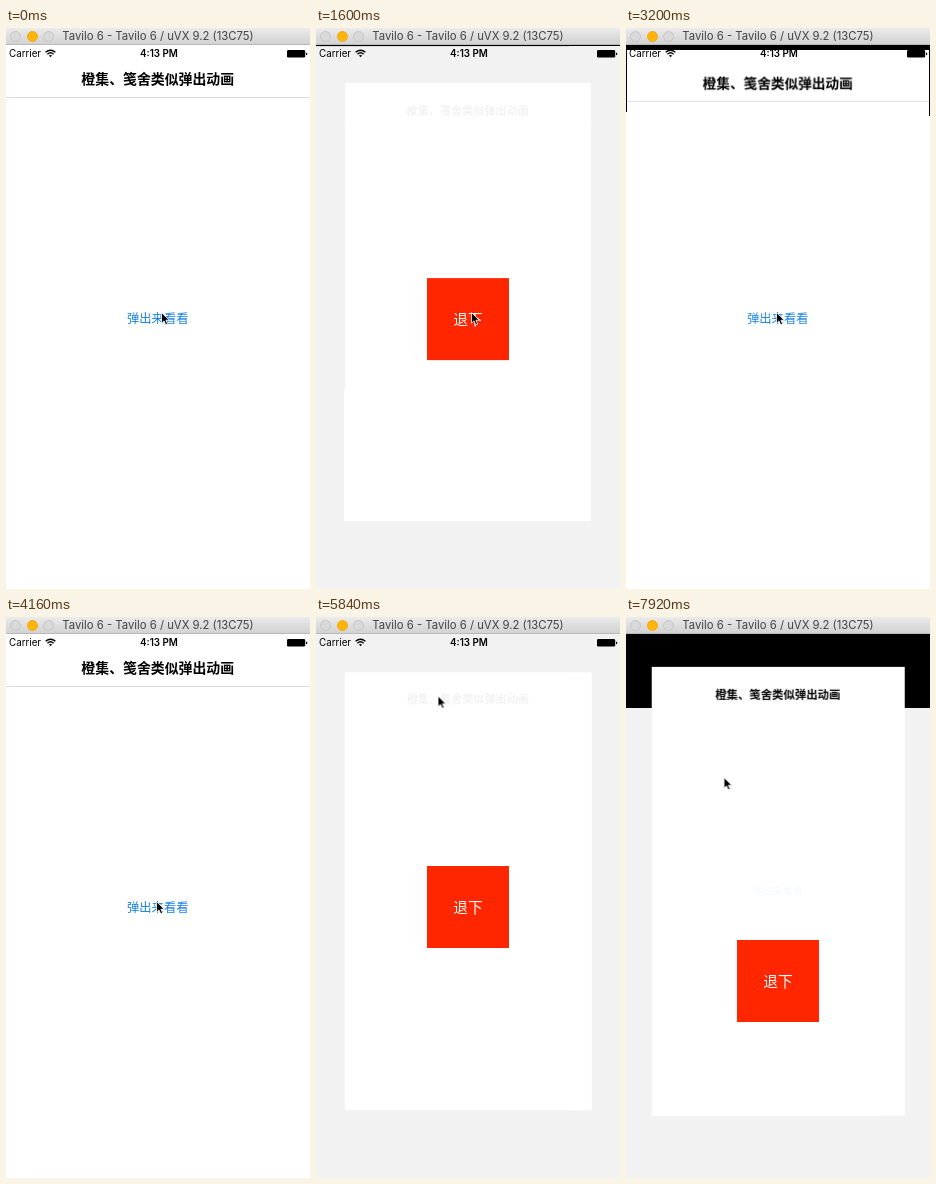
These frames come from a looping animation (304x561 px, 8 s). An HTML page:

```html
<!DOCTYPE html>
<html lang="zh">
<head>
<meta charset="utf-8">
<title>Popup transition</title>
<style>
  html, body { margin: 0; width: 100%; height: 100%; overflow: hidden; background: #000; }
  body { position: relative; font-family: "Noto Sans CJK SC", "Noto Sans CJK", sans-serif; }
  .stage { position: absolute; left: 0; top: 0; width: 304px; height: 561px; overflow: hidden; background: #000; }
  .stage div, .stage svg { position: absolute; box-sizing: border-box; }

  .page, .popup { left: -1.75px; top: 17px; width: 307.5px; height: 547px; }
  .page { background: #fff; animation: page 8s ease-in-out infinite; }
  .popup { background: rgba(255, 255, 255, .95); animation: popup 8s ease-in-out infinite; }

  .center { left: 0; width: 100%; text-align: center; white-space: nowrap; }
  .heading { top: 23px; line-height: 20px; font-size: 13.9px; font-weight: 700; color: #000; }
  .rule { left: 0; top: 52px; width: 100%; height: 1px; background: #dedede; }
  .link { top: 263px; line-height: 20px; font-size: 12.3px; color: #1480e2; }
  .button { left: 112.75px; top: 232px; width: 82px; height: 82px; background: #ff2600;
    line-height: 82px; text-align: center; font-size: 14.7px; color: #fff; }

  .titlebar { left: 0; top: 0; width: 304px; height: 17px; background: linear-gradient(#ebebeb, #d2d2d2);
    border-bottom: 1px solid #b9b9b9; }
  .caption { top: 0; font: 11.3px/17px Inter, sans-serif; color: #444; }
  .dot { top: 2.5px; width: 11px; height: 11px; border-radius: 50%; background: #d9d9d9; border: 1px solid #c6c6c6; }
  .dot.on { background: #fdb50d; border-color: #f5ad0c; }

  .status { left: 0; top: 17px; width: 304px; height: 17px; font: 9.8px/17px Inter, sans-serif; color: #000; }
  .cursor { left: 0; top: 0; animation: cursor 8s linear infinite; }

  @keyframes page {
    0%, 10%, 41.28%, 55.375% { transform: perspective(738px) translateY(0) scale(1) rotateX(0deg); }
    15.2%, 36.28%, 60.375% { transform: perspective(738px) translateY(0) scale(.95) rotateX(15deg); }
    20.35%, 31.28%, 65.375% { transform: perspective(738px) translateY(-16.5px) scale(.8) rotateX(0deg); }
    75% { transform: perspective(738px) translateY(-16.5px) scale(.8) rotateX(0deg); animation-timing-function: linear; }
    80.5% { transform: perspective(738px) translateY(-16.5px) scale(.8016) rotateX(0deg); animation-timing-function: linear; }
    86% { transform: perspective(738px) translateY(-16.5px) scale(.8065) rotateX(0deg); animation-timing-function: linear; }
    99%, 100% { transform: perspective(738px) translateY(-16.5px) scale(.8195) rotateX(0deg); }
  }
  @keyframes popup {
    0%, 10%, 41.28%, 55.375% { transform: translateY(547px); }
    20.35%, 31.28%, 65.375% { transform: translateY(0); }
    75% { transform: translateY(0); animation-timing-function: linear; }
    86% { transform: translateY(42px); animation-timing-function: linear; }
    96% { transform: translateY(71px); animation-timing-function: linear; }
    99%, 100% { transform: translateY(74px); }
  }
  @keyframes cursor {
    0%, 29% { transform: translate(155px, 284px); }
    33%, 54% { transform: translate(150px, 284px); }
    57%, 65% { transform: translate(152px, 288px); animation-timing-function: ease-in-out; }
    70%, 75% { transform: translate(121.5px, 78.5px); }
    86% { transform: translate(118px, 132px); }
    96% { transform: translate(99px, 158px); }
    99%, 100% { transform: translate(97.5px, 160px); }
  }
</style>
</head>
<body>
<div class="stage">
  <div class="page">
    <div class="center heading">橙集、笺舍类似弹出动画</div>
    <div class="rule"></div>
    <div class="center link">弹出来看看</div>
  </div>
  <div class="popup"><div class="button">退下</div></div>

  <div class="status">
    <div style="left:3px">Carrier</div>
    <svg style="left:39px;top:4px" width="11" height="9" viewBox="0 0 11 9" fill="none" stroke="#000" stroke-width="1.4">
      <path d="M.6 3.3Q5.5-1 10.4 3.3M2.4 5.2Q5.5 2.5 8.6 5.2"/>
      <path d="M5.5 8.3L3.9 6.6Q5.5 5.3 7.1 6.6Z" fill="#000" stroke="none"/>
    </svg>
    <div class="center" style="left:1px;font-weight:600">4:13 PM</div>
    <svg style="left:281px;top:5px" width="21" height="8" viewBox="0 0 21 8">
      <rect width="18.2" height="7.6" rx="1.4"/>
      <path d="M19 2.6q1.4.3 1.4 1.3T19 5.2z"/>
    </svg>
  </div>

  <div class="titlebar">
    <div class="dot" style="left:4px"></div>
    <div class="dot on" style="left:20.5px"></div>
    <div class="dot" style="left:37px"></div>
    <div class="center caption">Tavilo 6 - Tavilo 6 / uVX 9.2 (13C75)</div>
  </div>

  <svg class="cursor" width="11" height="15" viewBox="0 0 11 15">
    <path d="M.5.6V11.2L3 8.9 4.7 12.8 6.6 12 4.9 8.2H8.3Z" stroke="#fff" stroke-width=".8"/>
  </svg>
</div>
</body>
</html>
```
